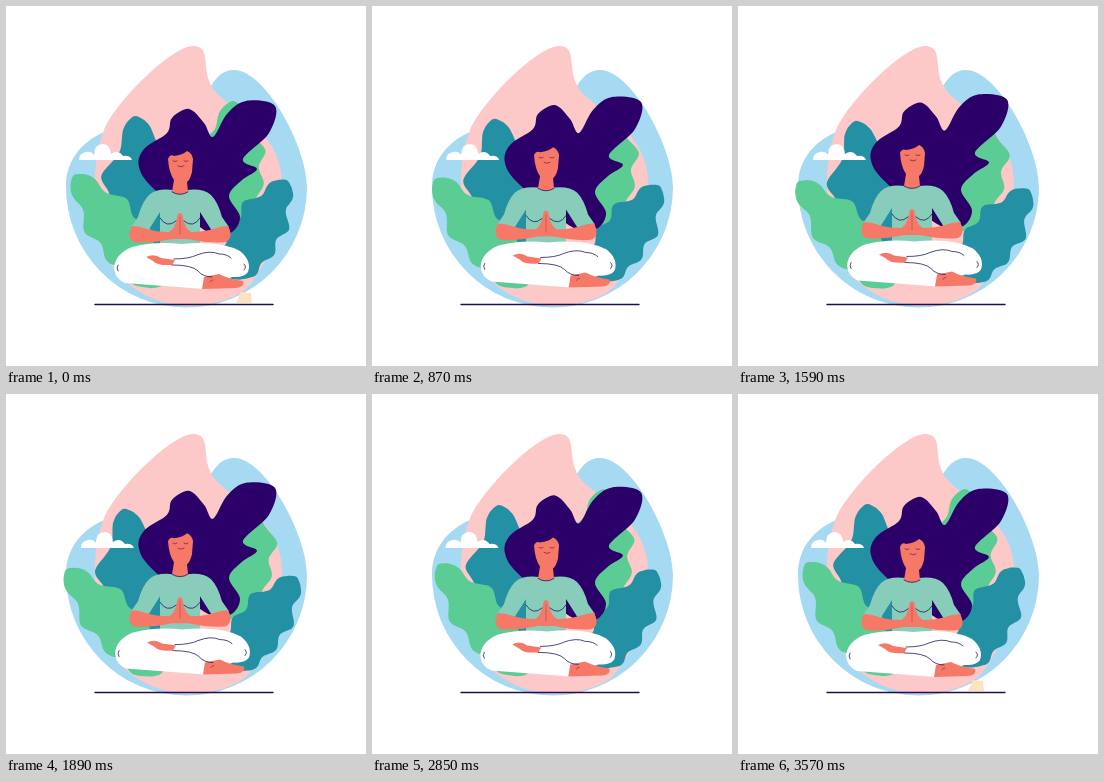
An HTML page that plays this animation: 360 by 360 pixels, repeating every 3600 ms.

```html
<!DOCTYPE html>
<html lang="en">
<head>
<meta charset="utf-8">
<title>Meditation</title>
<style>
html, body { margin: 0; width: 100%; height: 100%; overflow: hidden; background: #fff; }
svg { display: block; width: 100vw; height: 100vh; }
</style>
</head>
<body>
<svg id="stage" viewBox="0 0 360 360"></svg>
<script>
const LOOP = 3600, LEAD = 150, MIDDLE = 174;
const C = {
  sky: '#a5daf2', pink: '#fcc8c8', teal: '#2390a3', green: '#5bcc94',
  hair: '#2b0068', skin: '#f57966', shirt: '#87cdb9', ink: '#26195c', white: '#fff'
};
const stage = document.getElementById('stage');

function add(parent, tag, attrs) {
  const el = document.createElementNS('http://www.w3.org/2000/svg', tag);
  for (const key in attrs) el.setAttribute(key, attrs[key]);
  return parent.appendChild(el);
}
const group = () => add(stage, 'g', {});
const fill = (g, d, color) => add(g, 'path', { d, fill: color });
const line = (g, d, color = C.ink, width = 0.8) => add(g, 'path', {
  d, fill: 'none', stroke: color, 'stroke-width': width, 'stroke-linecap': 'round'
});

// The same path on both sides of the body axis
function both(draw, g, d, color) {
  draw(g, d, color);
  draw(g, d, color).setAttribute('transform', `translate(${2 * MIDDLE} 0) scale(-1 1)`);
}

// Closed smooth curve through points
function smooth(pts) {
  const at = i => pts[(i + pts.length) % pts.length];
  return 'M' + pts[0] + pts.map((a, i) => {
    const before = at(i - 1), b = at(i + 1), after = at(i + 2);
    const c1 = a.map((v, k) => v + (b[k] - before[k]) / 6);
    const c2 = b.map((v, k) => v - (after[k] - a[k]) / 6);
    return `C${c1} ${c2} ${b}`;
  }).join('') + 'Z';
}

const clamp = x => Math.max(0, Math.min(1, x));
const ease = x => x * x * (3 - 2 * x);
const dome = x => Math.sqrt(1 - (1 - clamp(x)) ** 2);

// Rounded leaf from tip to base: a slim head widening to a rippled body
function leaf(tip, base, slim, wide, color) {
  const g = group(), steps = 36;
  const dx = base[0] - tip[0], dy = base[1] - tip[1], len = Math.hypot(dx, dy);
  const half = u => dome(u * len / slim) * dome((1 - u) / 0.35) *
    (slim + (wide - slim) * ease(clamp((u - 0.1) / 0.28)) +
     3 * Math.sin(2 * Math.PI * (4 * u + 0.77)));
  const edge = (u, side) => {
    const w = side * half(u) / len;
    return [tip[0] + dx * u - dy * w, tip[1] + dy * u + dx * w];
  };
  const pts = [];
  for (let i = 0; i < steps; i++) pts.push(edge(i / steps, 1));
  for (let i = steps; i > 0; i--) pts.push(edge(i / steps, -1));
  fill(g, smooth(pts), color);
  return g;
}

// Backdrop
const back = group();
fill(back, 'M60 180A120.500 120.500 0 0 0 301 182C301 140 259 64 228 64C216 64 210 72 205 80L150 100L98 126C75 136 60 155 60 180Z', C.sky);
fill(back, 'M187 40C205 40 196 60 204 77C212 100 276 120 276 176C276 220 262 260 240 283C225 295 200 300 185 300C150 300 100 280 93 220C86 180 88 150 98 124C108 98 165 40 187 40Z', C.pink);
const spark = fill(back, 'M230 297L235 286L245 287L246 297Z', '#fbe3bf');
line(back, 'M89 298.5H267', '#210c4e', 1.4);

// Leaves
const tealL = leaf([129, 110], [150, 260], 12, 39, C.teal);
const greenL = leaf([68, 169], [155, 280], 11, 24, C.green);
const greenR = leaf([227, 95], [220, 225], 11, 32, C.green);
const tealR = leaf([281, 174], [223, 272], 11, 24, C.teal);

// Cloud
const cloud = group();
fill(cloud, 'M73 154Q73 147 80 146Q85 145 88 149Q88 138 97 138Q104 138 105 148Q112 143 117 150Q124 149 126 154Z', C.white);

// Hair
const hair = group();
fill(hair, smooth([
  [183, 103], [166, 112], [161, 127], [138, 143], [133, 161], [148, 183],
  [200, 225], [224, 227], [234, 211], [223, 190], [236, 174], [251, 163],
  [237, 153], [263, 127], [269, 100], [240, 95], [221, 108], [207, 131], [198, 117]
]), C.hair);

// Torso and arms
const body = group();
both(fill, body, 'M174.500 184H167Q151 182 143 189Q136 196 132 211L125 221L142 225L154 206V244H174.500Z', C.shirt);
both(fill, body, 'M126 220Q120 231 128 236Q142 238 166 233H174.500V207Q171 207 171 212Q169 223 163 226Q150 226 141 223Q133 220 126 220Z', C.skin);
both(line, body, 'M154 212Q161 223 170 215');
line(body, 'M174 211V228', '#a94e59', 0.6);

// Head
const head = group();
fill(head, 'M162 153Q164 148 168 150Q177 149 181 145Q186 147 187 153L186 166Q184 174 181 176L182 186Q174 191 166 186L168 174Q163 167 162 153Z', C.skin);
line(head, 'M166 186Q174 191 182 186');
line(head, 'M167 155Q169 156.500 171 155M178 155Q180 156.500 182 155M172 160Q175 162 178 160', '#7d2850');

// Legs
const legs = group();
fill(legs, 'M108 262Q109 248 126 241Q149 235 175 238Q214 234 234 245Q246 255 242 266Q238 272 226 271L198 283L119 277Q109 273 108 262Z', C.white);
fill(legs, 'M140 251Q148 247 155 252L169 254L166 259Q151 260 147 255Z', C.skin);
fill(legs, 'M198 271L213 268Q222 273 237 275Q239 281 230 282L196 283Z', C.skin);
line(legs, 'M168 253Q183 253 191 249Q204 244 213 248Q221 248 225 252M166 259Q186 259 192 265Q197 271 206 271');
line(legs, 'M112 259Q110 262 112 265M238 258Q241 261 238 264');
line(legs, 'M204 276Q205 273 207 274', '#7d2850', 0.6);

const sway = (g, angle, x, y) => g.setAttribute('transform', `rotate(${angle} ${x} ${y})`);
const shift = (g, x, y) => g.setAttribute('transform', `translate(${x} ${y})`);

// One breath per loop
function draw(t) {
  const p = (1 - Math.cos(2 * Math.PI * (t + LEAD) / LOOP)) / 2;
  sway(tealL, -5 * p, 180, 250);
  sway(greenL, -4.6 * p, 150, 275);
  sway(greenR, 7 * p, 222, 250);
  sway(tealR, 6.3 * p, 200, 270);
  shift(cloud, 2 * p, 0);
  shift(hair, 0, -6.5 * p);
  shift(head, 0, -6 * p);
  shift(body, 0, -4 * p);
  shift(legs, p, -2.5 * p);
  spark.style.display = p < 0.05 ? '' : 'none';
}

const start = performance.now();
function tick() {
  draw((performance.now() - start) % LOOP);
  requestAnimationFrame(tick);
}
tick();
</script>
</body>
</html>
```
